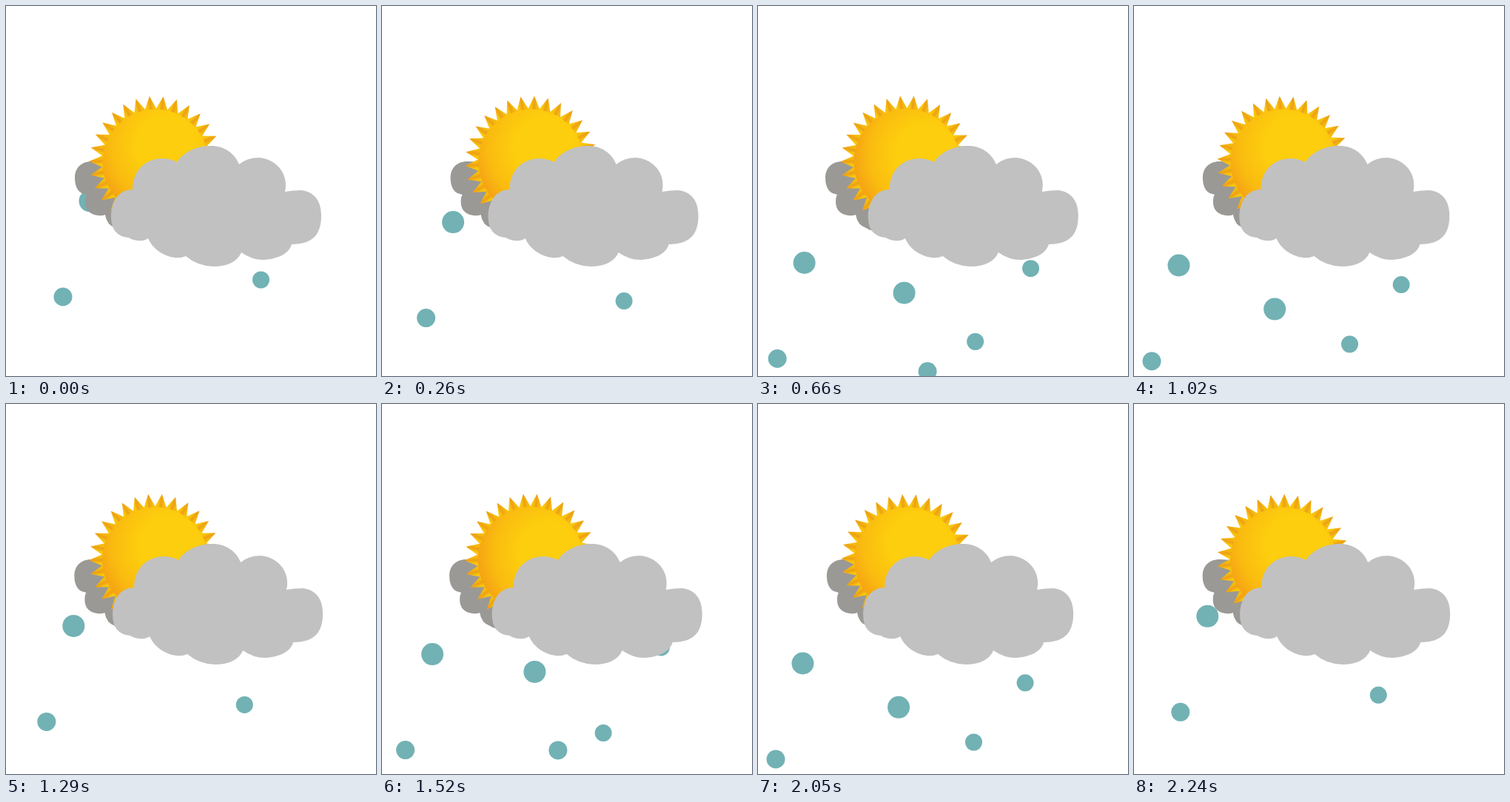
Recreate the animation shown at these times as an HTML page. Size 500 by 500 pixels, loop 2.28 s.

```html
<!DOCTYPE html>
<html lang="en">
<head>
<meta charset="utf-8">
<title>Sun, clouds and rain</title>
<style>
html, body { margin: 0; width: 100%; height: 100%; overflow: hidden; background: #fff; }
svg { display: block; width: 100vw; height: 100vh; }
</style>
</head>
<body>
<svg viewBox="0 0 500 500">
  <defs>
    <radialGradient id="glow" gradientUnits="userSpaceOnUse" cx="12" cy="-24" r="106">
      <stop offset=".38" stop-color="#fdce0d"/>
      <stop offset=".72" stop-color="#fabb10"/>
      <stop offset="1" stop-color="#f39a15"/>
    </radialGradient>
    <linearGradient id="flame">
      <stop offset=".25" stop-color="#f9c60c"/>
      <stop offset=".5" stop-color="#eda014"/>
      <stop offset=".75" stop-color="#f6bc0e"/>
    </linearGradient>
  </defs>
  <g id="early" fill="#72b2b4">
    <circle cx="60.5" cy="350.5" r="15"/>
    <circle cx="24" cy="480" r="12.5"/>
    <circle cx="291.5" cy="457" r="11.5"/>
  </g>
  <g id="late" fill="#72b2b4">
    <circle cx="190" cy="410" r="15"/>
    <circle cx="221.5" cy="516" r="12.5"/>
    <circle cx="361" cy="377" r="11.5"/>
  </g>
  <path id="back" fill="#9b9996" d="M106 254C96 252 93 242 93 232C93 218 103 209 118 210L150 212L180 300Q160 308 148 300Q136 296 134 282Q130 284 124 283C110 281 107 272 107 264Q107 258 109 255Z"/>
  <g id="sun">
    <g id="rays" fill="url(#flame)"></g>
    <circle r="71.5" fill="url(#glow)"/>
  </g>
  <path id="front" fill="#c1c1c1" d="M142 285C142 262 154 248 171 248C171 222 189 206 211 206Q222 206 231 211C240 197 258 189 277 189C295 189 309 199 315 214Q326 205 341 205C362 206 379 222 378 244L377 251Q388 249 399 249C417 251 426 264 426 283C426 306 417 322 386 322C383 334 368 342 348 343Q332 343 318 333C313 345 300 352 280 352Q258 351 243 338Q236 341 228 340C212 338 198 328 192 314Q186 318 178 317Q170 316 166 313Q142 311 142 285Z"/>
</svg>
<script>
const LOOP = 2280, DELAY = 100, CYCLE = 1000, RAYS = 30;
const $ = id => document.getElementById(id);

$('rays').innerHTML = Array.from({ length: RAYS }, (_, i) =>
  `<path d="M-8.5 -70L0 -89.5L8.5 -70Z" transform="rotate(${i * 360 / RAYS})"/>`).join('');

// Cubic Bézier easing, solved by bisection
const bezier = (x1, y1, x2, y2) => x => {
  if (x <= 0 || x >= 1) return x <= 0 ? 0 : 1;
  const at = (s, a, b) => 3 * a * s * (1 - s) ** 2 + 3 * b * s * s * (1 - s) + s ** 3;
  let lo = 0, hi = 1;
  for (let i = 0; i < 24; i++) {
    const mid = (lo + hi) / 2;
    if (at(mid, x1, x2) < x) lo = mid; else hi = mid;
  }
  return at(lo, y1, y2);
};
const ease = bezier(.25, .1, .25, 1);
const easeInOut = bezier(.42, 0, .58, 1);

const move = (id, x, y, extra = '') =>
  $(id).setAttribute('transform', `translate(${x} ${y})${extra}`);

function draw(now) {
  const p = Math.max(0, now % LOOP - DELAY) % CYCLE / CYCLE;
  const sway = p < .5 ? easeInOut(p * 2) : 1 - easeInOut(p * 2 - 1);
  move('front', 7 * sway, 0);
  move('back', -2 * sway, 0);
  move('sun', 202 - sway, 211 - .5 * sway, ` rotate(${6.8 + 36.5 * sway})`);

  // The first drops fall, then rest; the others appear a quarter cycle later
  const left1 = 1 - ease(p / .75), left2 = 1 - ease((p - .25) / .75);
  move('early', 53 * left1, -87 * left1);
  move('late', 25.5 * left2, -75 * left2);
  $('late').setAttribute('visibility', p < .25 ? 'hidden' : 'visible');
}

const start = performance.now();
function tick() {
  draw(performance.now() - start);
  requestAnimationFrame(tick);
}
tick();
</script>
</body>
</html>
```
